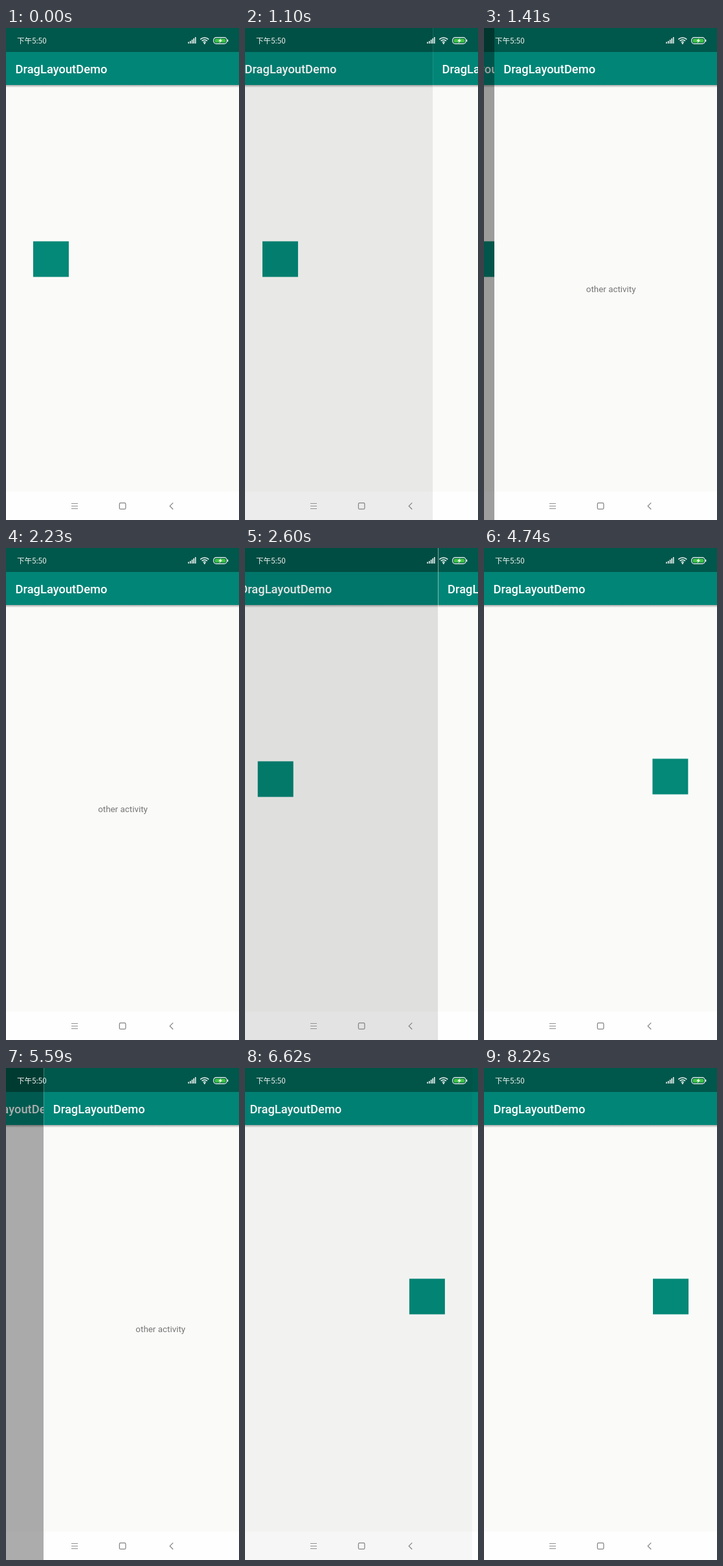
Write an HTML page that moves like this. It is 360 px wide and 760 px high and loops after 9.25 s.

```html
<!DOCTYPE html>
<html lang="en">
<head>
<meta charset="utf-8">
<title>DragLayoutDemo</title>
<style>
  @property --away { syntax: "<number>"; inherits: true; initial-value: 0; }

  html, body { margin: 0; width: 100%; height: 100%; overflow: hidden; background: #fafbf9; }
  svg { display: block; width: 360px; height: 760px; }

  .title { font: 500 18.33px Roboto, sans-serif; fill: #fff; }
  .label { font: 13.4px Roboto, sans-serif; fill: #757575; text-anchor: middle; }
  .clock { font: 11.6px "Noto Sans CJK SC", "Noto Sans CJK", "Noto Sans", sans-serif; fill: #f0f6f4; }

  /* cubic-bezier(1/3, 2/3, 2/3, 1) is an exact quadratic ease-out */
  .home, .page { animation: 9250ms cubic-bezier(.3333, .6667, .6667, 1) infinite; }

  /* --away: 0 = home in front, 1 = home fully behind the page */
  .home { animation-name: recede; transform: translateX(calc(var(--away) * -90px)); }
  .dim { opacity: calc(var(--away) * .42); }
  .page { animation-name: slide; transform: translateX(360px); }
  .icon { animation: drag 9250ms cubic-bezier(.37, 0, .63, 1) infinite; }

  @keyframes slide {
    0%, 11.405%, 30.13%, 57.535%, 72.357%, 100% { transform: translateX(360px); }
    16.27%, 25.265%, 62.4%, 67.492% { transform: translateX(0); }
  }
  @keyframes recede {
    0%, 11.405%, 30.951%, 57.535%, 73.178%, 100% { --away: 0; }
    17.092%, 25.265%, 63.222%, 67.492% { --away: 1; }
  }
  @keyframes drag {
    0%, 33.514% { transform: translate(0, 0); }
    51.892%, 100% { transform: translate(219px, -4px); }
  }
</style>
</head>
<body>
<svg viewBox="0 0 360 760">
  <defs>
    <linearGradient id="shade" x2="0" y2="1">
      <stop stop-color="#404040" stop-opacity=".45"/>
      <stop offset="1" stop-color="#404040" stop-opacity="0"/>
    </linearGradient>
    <g id="screen">
      <rect width="360" height="760" fill="#fafbf9"/>
      <rect y="716" width="360" height="44" fill="#fefefe"/>
      <rect y="88" width="360" height="4" fill="url(#shade)"/>
      <rect y="37" width="360" height="51" fill="#008577"/>
      <rect width="360" height="37" fill="#00574b"/>
      <text class="title" x="14.5" y="69.7">DragLayoutDemo</text>
    </g>
  </defs>

  <g class="home">
    <use href="#screen"/>
    <rect class="icon" x="42" y="329.5" width="55" height="55" fill="#048877"/>
    <rect class="dim" width="360" height="760"/>
  </g>

  <g class="page">
    <use href="#screen"/>
    <text class="label" x="180.5" y="408">other activity</text>
  </g>

  <!-- status bar -->
  <text class="clock" x="17" y="24">下午5:50</text>
  <path d="M282 24v-2.5M284.8 24v-4M287.6 24v-6M290.2 24v-8M292.7 24v-10" stroke="#f0f6f4" stroke-width="1.6"/>
  <g fill="none" stroke="#f0f6f4" stroke-width="1.5">
    <path d="M300.3 17.6a9.3 9.3 0 0 1 13 0M302.6 20a6 6 0 0 1 8.4 0M304.8 22.2a2.9 2.9 0 0 1 4 0"/>
    <circle cx="306.8" cy="23.7" r=".5"/>
  </g>
  <rect x="320.7" y="14.7" width="20.6" height="9.6" rx="4.2" fill="#00574b" stroke="#f0f6f4" stroke-width="1.2"/>
  <rect x="322.5" y="16.4" width="17" height="6.2" rx="2.6" fill="#3fc543"/>
  <path d="M342.6 17.8v3.4" stroke="#f0f6f4" stroke-width="1.4"/>
  <path d="M332.6 15.4l-4.4 4.8h2.6l-1.4 3.6 4.8-5h-2.8z" fill="#fff"/>

  <!-- navigation bar -->
  <g fill="none" stroke="#828282" stroke-width="1.2">
    <path d="M101 734.5h10M101 738.5h10M101 742.5h10" stroke="#929292"/>
    <rect x="175.3" y="733.6" width="9.6" height="9.6" rx="1.8"/>
    <path d="M258.2 733.3l-5 5.1 5 5.1"/>
  </g>
</svg>
</body>
</html>
```
